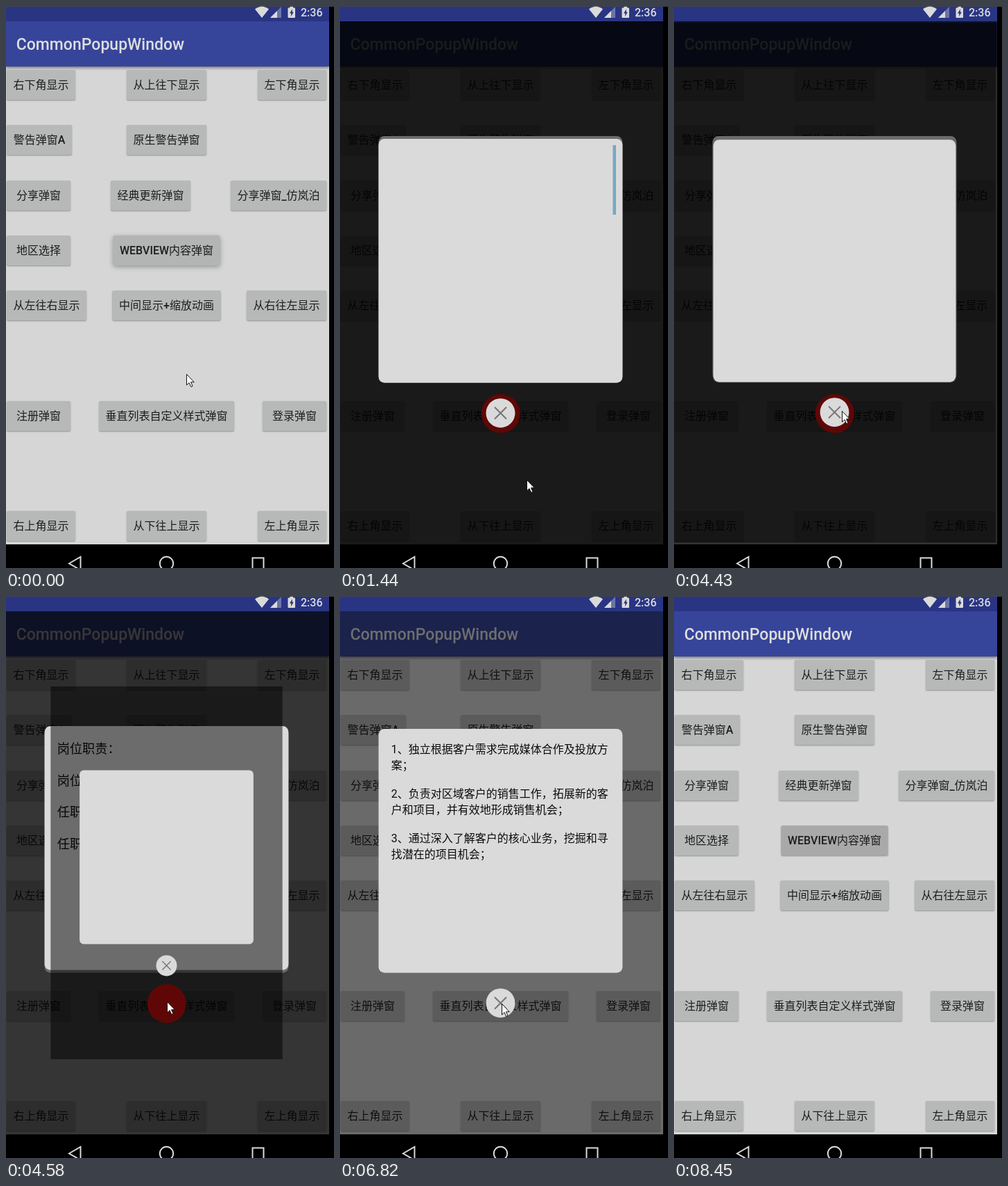
Recreate the animation shown at these times as an HTML page with a canvas. Size 473x808 px, loop 8.6 s.

```html
<!DOCTYPE html>
<html lang="zh-CN">
<head>
<meta charset="utf-8">
<style>
html, body { margin: 0; width: 100%; height: 100%; overflow: hidden; background: #000; }
canvas { display: block; }
</style>
</head>
<body>
<canvas id="stage" width="473" height="808"></canvas>
<script>
const ctx = document.getElementById('stage').getContext('2d');
const LOOP = 8600;
const FONT = "Roboto, 'Noto Sans CJK SC', 'Noto Sans CJK', sans-serif";
const LIGHT = '#dadada', INK = '#0c0c0c';

// The screen refreshes in bursts: start and interval
const bursts = [[0, 120], [600, 138.8], [4430, 140], [5990, 138], [7910, 135]];

// Pointer turns: time, x, y
const turns = [
  [0, 260, 529], [360, 257, 488], [600, 254, 472], [880, 170, 299], [1020, 80, 440],
  [1430, 269, 682], [2110, 262, 401], [2390, 300, 295], [2955, 242, 580], [4430, 242, 582],
  [4570, 232, 583], [4850, 167, 580], [5130, 198, 610], [5550, 234, 584], [5990, 234, 584],
  [6120, 318, 646], [6800, 233, 586], [7910, 233, 586], [8315, 398, 769]
];
const POINTER_GONE = 8450;

const rows = [
  ['右下角显示', '从上往下显示', '左下角显示'],
  ['警告弹窗A', '原生警告弹窗'],
  ['分享弹窗', '经典更新弹窗', '分享弹窗_仿岚泊'],
  ['地区选择', 'WEBVIEW内容弹窗'],
  ['从左往右显示', '中间显示+缩放动画', '从右往左显示'],
  [],
  ['注册弹窗', '垂直列表自定义样式弹窗', '登录弹窗'],
  [],
  ['右上角显示', '从下往上显示', '左上角显示']
];

const duties = [
  ['1、独立根据客户需求完成媒体合作及投放方', '案；'],
  ['2、负责对区域客户的销售工作，拓展新的客', '户和项目，并有效地形成销售机会；'],
  ['3、通过深入了解客户的核心业务，挖掘和寻', '找潜在的项目机会；']
];
const headings = [['岗位职责：'], ['岗位职责：'], ['任职要求：'], ['任职要求：']];

const popups = [
  { open: 20, close: 7740, top: 191, size: 16, gap: 64, paras: duties },
  { open: 55, close: 5810, top: 187, size: 18.2, gap: 45.5, paras: headings, badge: true },
  { open: 209, close: 4406, top: 191, size: 16, gap: 64, paras: duties, bar: true }
];

function text(str, x, y, size, color, weight = 400, align = 'left') {
  ctx.font = `${weight} ${size}px ${FONT}`;
  ctx.textAlign = align;
  ctx.fillStyle = color;
  ctx.fillText(str, x, y);
}

function rect(x, y, w, h, color) {
  ctx.fillStyle = color;
  ctx.fillRect(x, y, w, h);
}

function roundRect(x, y, w, h, r, color) {
  ctx.beginPath();
  ctx.roundRect(x, y, w, h, r);
  ctx.fillStyle = color;
  ctx.fill();
}

function disc(x, y, r, color) {
  ctx.beginPath();
  ctx.arc(x, y, r, 0, 7);
  ctx.fillStyle = color;
  ctx.fill();
}

function poly(points, fill, stroke, width = 1) {
  ctx.beginPath();
  points.forEach(([x, y]) => ctx.lineTo(x, y));
  ctx.closePath();
  if (fill) { ctx.fillStyle = fill; ctx.fill(); }
  if (stroke) { ctx.strokeStyle = stroke; ctx.lineWidth = width; ctx.stroke(); }
}

function shadow(color, blur, dy) {
  ctx.shadowColor = color;
  ctx.shadowBlur = blur;
  ctx.shadowOffsetY = dy;
}

function button(label, x, w, y, t) {
  const active = label.startsWith('WEBVIEW');
  const raised = active && t < 1000;
  shadow('rgba(0,0,0,.32)', raised ? 7 : 2, raised ? 2 : 1);
  roundRect(x, y, w, 43, 2, active ? (raised ? '#b3b4b4' : '#a9a9a9') : '#b7b8b8');
  shadow('transparent', 0, 0);
  text(label, x + w / 2, y + 27, 16, '#1c1c1c', 500, 'center');
}

function drawPage(t) {
  rect(0, 22, 466, 752, '#d6d6d6');
  shadow('rgba(0,0,0,.45)', 4, 1.5);
  rect(0, 22, 466, 65, '#36459a');
  shadow('transparent', 0, 0);
  text('CommonPopupWindow', 14.7, 63, 23, '#dedede', 500);

  rows.forEach((labels, i) => {
    const y = Math.round(92 + i * 79.25);
    ctx.font = `500 16px ${FONT}`;
    const w = labels.map(s => Math.max(92, Math.round(ctx.measureText(s).width + 19)));
    const mid = labels[2] ? (463 + w[0] - w[2]) / 2 : 231.5;
    const xs = [1, mid - w[1] / 2, 462 - w[2]];
    labels.forEach((s, k) => button(s, xs[k], w[k], y, t));
  });
}

// Opens decelerating, closes accelerating
function scaleAt(p, t) {
  const out = (t - p.close) / 306;
  if (out > 0) return Math.max(0, 1 - out * out);
  const left = 1 - Math.min(1, Math.max(0, (t - p.open) / 300));
  return 1 - left * left;
}

function closeButton(x, y) {
  const d = 8.5;
  disc(x, y, 21, LIGHT);
  ctx.beginPath();
  ctx.moveTo(x - d, y - d);
  ctx.lineTo(x + d, y + d);
  ctx.moveTo(x - d, y + d);
  ctx.lineTo(x + d, y - d);
  ctx.strokeStyle = '#757575';
  ctx.lineWidth = 2;
  ctx.stroke();
}

function drawPopup(p, t) {
  const s = scaleAt(p, t);
  if (s <= 0) return;
  ctx.save();
  ctx.translate(231.5, 398);
  ctx.scale(s, s);
  ctx.translate(-231.5, -398);
  rect(-3, 22, 469, 752, 'rgba(0,0,0,.5)');
  roundRect(55.6, p.top, 351.8, 350.7, 8.5, LIGHT);
  if (t > 2250 && t < p.close) {
    p.paras.forEach((lines, i) => lines.forEach((line, k) =>
      text(line, 73.7, 226 + i * p.gap + k * 23, p.size, INK)));
  }
  if (p.bar && t > 1010 && t < 2390) {
    ctx.globalAlpha = t < 2250 ? 1 : .5;
    rect(393.5, 200, 4.5, 100, '#76a9c6');
    ctx.globalAlpha = 1;
  }
  if (p.badge) disc(231.8, 586, 28, '#c00e0e');
  else closeButton(231.5, 585.2);
  ctx.restore();
}

function drawBars() {
  rect(0, 0, 466, 22, '#293583');
  rect(0, 0, 473, 1, '#444');
  ctx.beginPath();
  ctx.moveTo(369, 17);
  ctx.lineTo(359, 4.5);
  ctx.quadraticCurveTo(369, -3, 379, 4.5);
  ctx.fillStyle = LIGHT;
  ctx.fill();
  poly([[381, 17], [397, 17], [397, 1]], '#6b74a8');
  poly([[381, 17], [391, 17], [391, 7]], LIGHT);
  rect(409.5, 1, 4.5, 3, LIGHT);
  roundRect(406.5, 2.5, 10.5, 14.5, 1, LIGHT);
  poly([[412.8, 4.5], [409, 10.5], [411.2, 10.5], [411.2, 15], [414.8, 8.8], [412.8, 8.8]], '#293583');
  text('2:36', 425, 15, 16, LIGHT, 500);

  poly([[91, 801.5], [107.5, 792], [107.5, 811]], null, LIGHT, 2);
  ctx.beginPath();
  ctx.arc(231.5, 801.5, 9.7, 0, 7);
  ctx.stroke();
  ctx.strokeRect(355.5, 793.5, 16, 16);
}

function drawPointer(t) {
  if (t >= POINTER_GONE) return;
  const i = turns.findLastIndex(k => k[0] <= t);
  const a = turns[i], b = turns[i + 1] || a;
  const f = (t - a[0]) / (b[0] - a[0] || 1);
  ctx.save();
  ctx.translate(...[1, 2].map(k => Math.round(a[k] + (b[k] - a[k]) * f) + .5));
  poly([[0, 0], [0, 15.5], [3.6, 12.2], [6.2, 18], [8.6, 17], [6, 11.3], [10.8, 11.3]], '#fff', '#111');
  ctx.restore();
}

function frame(clock) {
  const [from, step] = bursts.findLast(b => b[0] <= clock);
  const t = from + Math.floor((clock - from) / step) * step;
  rect(0, 0, 473, 808, '#000');
  ctx.save();
  ctx.beginPath();
  ctx.rect(0, 22, 466, 752);
  ctx.clip();
  drawPage(t);
  popups.forEach(p => drawPopup(p, t));
  ctx.restore();
  drawBars();
  drawPointer(t);
}

const start = performance.now();
function tick() {
  frame((performance.now() - start) % LOOP);
  requestAnimationFrame(tick);
}
tick();
</script>
</body>
</html>
```
